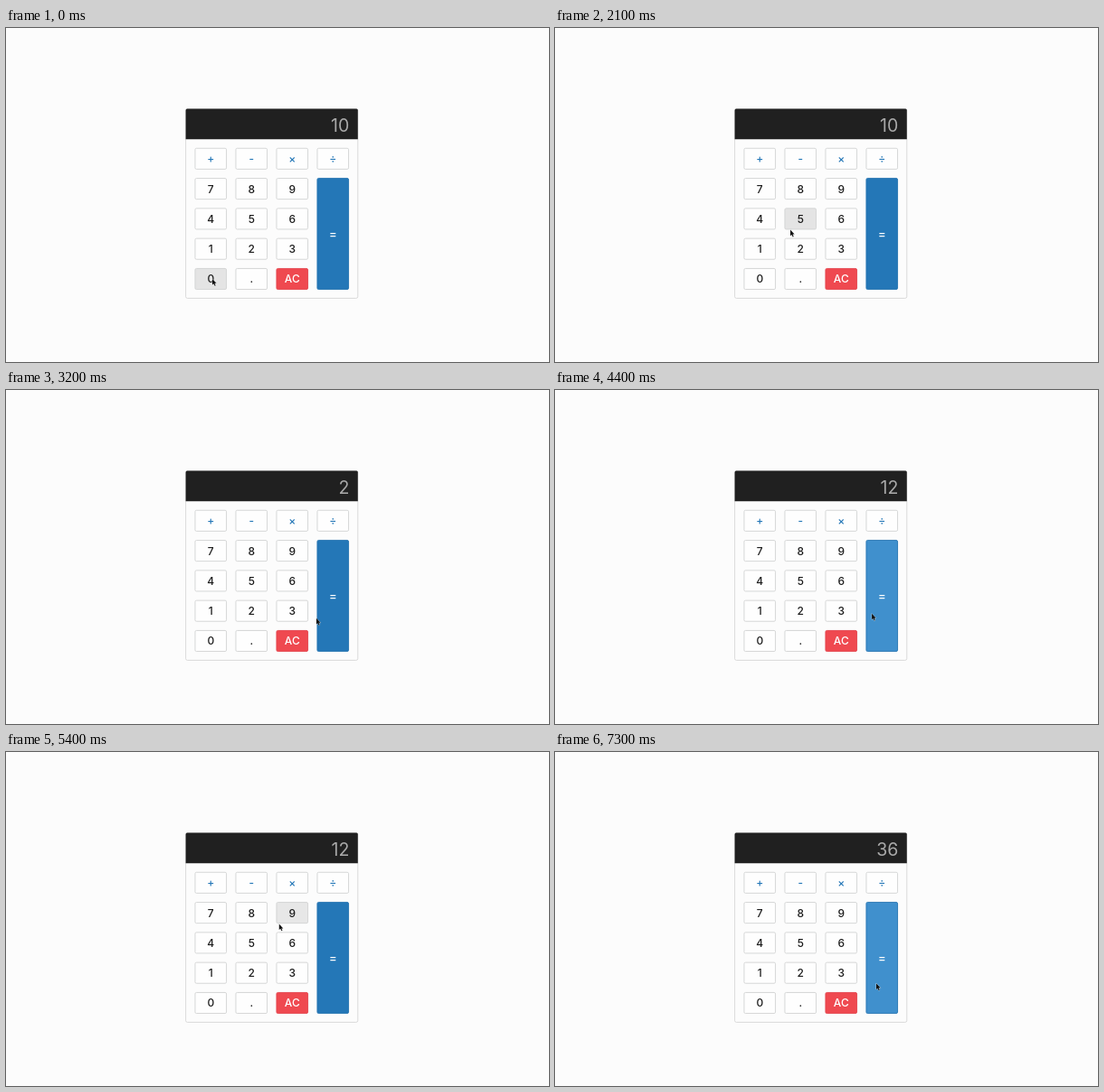
An HTML page with a canvas that plays this animation: 600x370 px, repeating every 8 s.

```html
<!DOCTYPE html>
<html lang="en">
<head>
<meta charset="utf-8">
<title>Calculator</title>
<style>
  html, body { margin: 0; width: 100%; height: 100%; overflow: hidden; background: #fcfcfc; }
  canvas { display: block; width: 600px; height: 370px; }
</style>
</head>
<body>
<canvas id="stage"></canvas>
<script>
const LOOP = 8000, STEP = 100, FADE = 100;
const FONT = 'Inter, "Liberation Sans", sans-serif';
const canvas = document.getElementById('stage');
const ctx = canvas.getContext('2d');
const ratio = window.devicePixelRatio || 1;
canvas.width = 600 * ratio;
canvas.height = 370 * ratio;

// Each move curves from the previous resting point, past a bend, to the next key
const home = { x: 228, y: 277.5 };
const moves = [
  { from: 200, to: 1320, bend: [380, 258], x: 231, y: 146 },
  { from: 1700, to: 2400, bend: [248, 193], x: 269, y: 246 },
  { from: 2700, to: 3500, bend: [331, 259], x: 351, y: 250 },
  { from: 4390, to: 5100, bend: [333, 198], x: 314, y: 146 },
  { from: 5200, to: 5700, bend: [290, 158], x: 312, y: 252 },
  { from: 6100, to: 7000, bend: [333, 255], x: 355, y: 256 }
];

const readings = [[0, '10'], [2600, '2'], [3700, '12'], [6000, '3'], [7300, '36']];

const plain = { base: [254, 254, 254], hover: [228, 228, 228], edge: '#d2d3d3', ink: '#1c1c1c' };
const operator = { ...plain, ink: '#2477b7' };
const clear = { base: [239, 73, 80], hover: [244, 108, 114], edge: '#e4454d', ink: '#fff' };
const equals = { base: [36, 119, 183], hover: [64, 144, 205], edge: '#2574b2', ink: '#fff' };

const buttons = [];
['+-×÷', '789', '456', '123', '0.C'].forEach((row, r) => {
  [...row].forEach((key, c) => {
    const style = key === 'C' ? clear : r === 0 ? operator : plain;
    buttons.push({
      label: key === 'C' ? 'AC' : key, style, size: 12,
      x: 208.5 + c * 45, y: 132.8 + r * 33.3, w: 35.5, h: 24
    });
  });
});
buttons.push({ label: '=', style: equals, size: 13, x: 343.5, y: 166, w: 35.5, h: 124 });

const easeOut = s => 1 - (1 - s) ** 1.8;
const bezier = (a, b, c, u) => a * (1 - u) ** 2 + 2 * b * u * (1 - u) + c * u * u;

function pointer(t) {
  let rest = home;
  for (const m of moves) {
    if (t <= m.from) break;
    if (t < m.to) {
      const u = easeOut((t - m.from) / (m.to - m.from));
      return [bezier(rest.x, m.bend[0], m.x, u), bezier(rest.y, m.bend[1], m.y, u)];
    }
    rest = m;
  }
  return [rest.x, rest.y];
}

// Hover strength after replaying the recent pointer path
function hoverAmount(b, t) {
  const dt = 5;
  let amount = 0;
  for (let s = t - 300; s <= t; s += dt) {
    const [x, y] = pointer(s);
    const inside = x >= b.x && x <= b.x + b.w && y >= b.y && y <= b.y + b.h;
    amount = Math.min(1, Math.max(0, amount + (inside ? dt : -dt) / FADE));
  }
  return amount;
}

function box(x, y, w, h, r, fill, stroke) {
  ctx.beginPath();
  ctx.roundRect(x, y, w, h, r);
  ctx.fillStyle = fill;
  ctx.fill();
  if (stroke) {
    ctx.strokeStyle = stroke;
    ctx.lineWidth = 0.9;
    ctx.stroke();
  }
}

function drawButton(b, t) {
  const { base, hover, edge, ink } = b.style;
  const k = hoverAmount(b, t);
  const fill = base.map((v, i) => Math.round(v + (hover[i] - v) * k));
  box(b.x + 0.45, b.y + 0.45, b.w - 0.9, b.h - 0.9, 1.5, `rgb(${fill})`, edge);
  ctx.fillStyle = ink;
  ctx.font = `450 ${b.size}px ${FONT}`;
  ctx.textAlign = 'center';
  ctx.fillText(b.label, b.x + b.w / 2, b.y + b.h / 2 + b.size * 0.37);
}

const arrow = new Path2D('M0 0V6.6L1.5 5.3L2.7 7.8L3.7 7.3L2.6 4.9H4.6Z');

function drawCursor(x, y) {
  ctx.save();
  ctx.translate(x, y + 0.4);
  ctx.lineJoin = 'round';
  ctx.lineWidth = 0.8;
  ctx.strokeStyle = 'rgba(255,255,255,.7)';
  ctx.stroke(arrow);
  ctx.fillStyle = '#111';
  ctx.fill(arrow);
  ctx.restore();
}

function draw(t) {
  ctx.setTransform(ratio, 0, 0, ratio, 0, 0);
  ctx.fillStyle = '#fcfcfc';
  ctx.fillRect(0, 0, 600, 370);
  box(198.6, 89.6, 190.2, 209.8, 2, '#fcfcfc', '#d6d6d6');
  box(198.6, 89.6, 190.2, 33.6, [1.5, 1.5, 0, 0], '#202020');

  ctx.fillStyle = '#a9a9a9';
  ctx.font = `400 19.5px ${FONT}`;
  ctx.textAlign = 'right';
  ctx.fillText(readings.filter(r => r[0] <= t).pop()[1], 379.3, 114.6);

  buttons.forEach(b => drawButton(b, t));
  drawCursor(...pointer(t));
}

const start = performance.now();
function tick() {
  const t = (performance.now() - start) % LOOP;
  draw(Math.floor(t / STEP) * STEP);
  requestAnimationFrame(tick);
}
tick();
</script>
</body>
</html>
```
